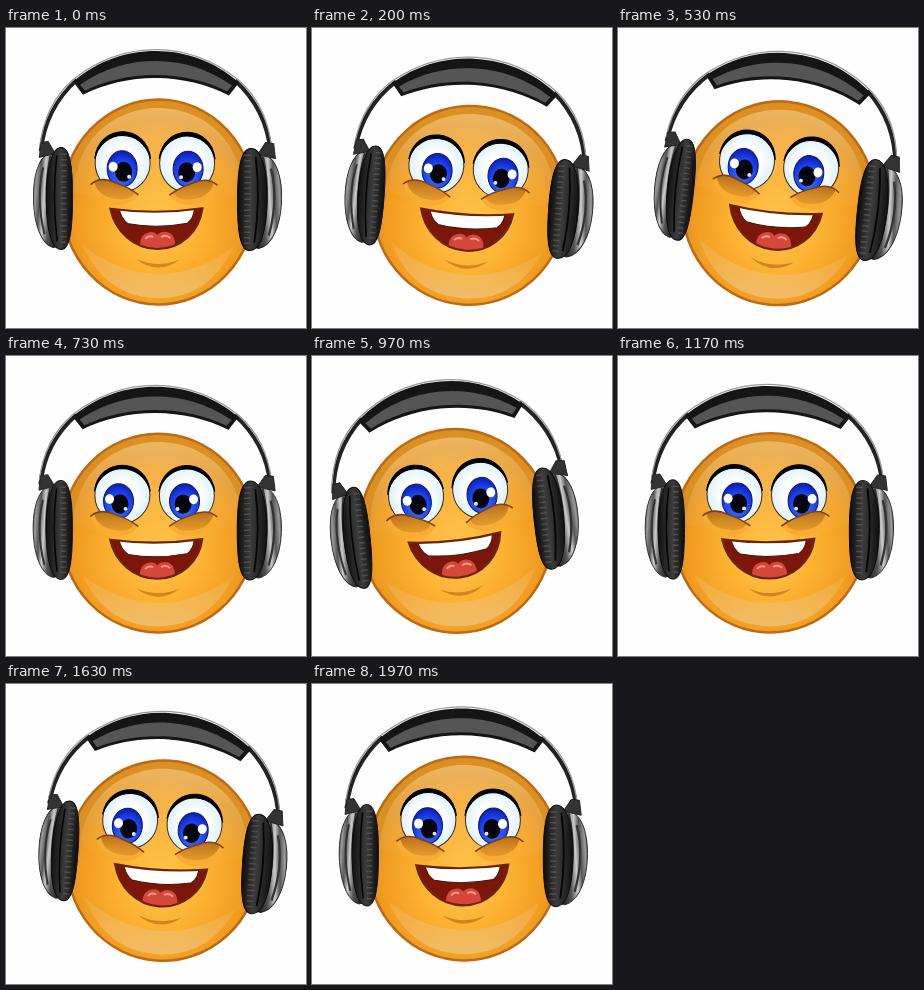
These frames come from a looping animation (300x300 px, 2000 ms). An HTML page:

```html
<!DOCTYPE html>
<html lang="en">
<head>
<meta charset="utf-8">
<title>Smiley with headphones</title>
<style>
html, body { margin: 0; height: 100%; overflow: hidden; background: #fefefe; }
svg { display: block; width: 100%; height: 100%; }
</style>
</head>
<body>
<svg viewBox="0 0 300 300">
  <defs>
    <radialGradient id="skin" cy=".6">
      <stop offset="0" stop-color="#ffc74f"/>
      <stop offset=".5" stop-color="#fcb030"/>
      <stop offset=".85" stop-color="#f09c20"/>
      <stop offset="1" stop-color="#dc8f22"/>
    </radialGradient>
    <linearGradient id="gloss" x2="0" y2="1">
      <stop offset="0" stop-color="#ffdca0" stop-opacity=".5"/>
      <stop offset="1" stop-color="#ffd68a" stop-opacity="0"/>
    </linearGradient>
    <linearGradient id="glow" x2="0" y2="1">
      <stop offset="0" stop-color="#f4c070" stop-opacity=".2"/>
      <stop offset="1" stop-color="#efc37c" stop-opacity=".8"/>
    </linearGradient>
    <linearGradient id="cheek" x2="0" y2="1">
      <stop offset="0" stop-color="#b8701c"/>
      <stop offset="1" stop-color="#d88c26" stop-opacity=".6"/>
    </linearGradient>
    <radialGradient id="white">
      <stop offset=".5" stop-color="#fff"/>
      <stop offset="1" stop-color="#def1fa"/>
    </radialGradient>
    <radialGradient id="iris" cx=".5" cy=".7" r=".7">
      <stop offset="0" stop-color="#3f78ff"/>
      <stop offset=".6" stop-color="#1c44ee"/>
      <stop offset="1" stop-color="#0c1cae"/>
    </radialGradient>
    <linearGradient id="metal" x2="1" y2=".2">
      <stop offset="0" stop-color="#333"/>
      <stop offset=".15" stop-color="#999"/>
      <stop offset=".3" stop-color="#555"/>
      <stop offset=".45" stop-color="#ccc"/>
      <stop offset=".65" stop-color="#555"/>
      <stop offset="1" stop-color="#111"/>
    </linearGradient>
    <linearGradient id="foam">
      <stop offset="0" stop-color="#111"/>
      <stop offset=".55" stop-color="#3c3c3c"/>
      <stop offset="1" stop-color="#0c0c0c"/>
    </linearGradient>
    <path id="lips" d="M104 181Q150 187 196 180C193 204 174 221 151 221S109 204 104 181Z"/>
    <clipPath id="mouth"><use href="#lips"/></clipPath>
    <g id="eye">
      <ellipse rx="27.5" ry="29" fill="url(#white)" stroke="#3a2a1a"/>
      <path d="M-28-4C-24-40 24-40 28-4C20-35-20-35-28-4Z" stroke="#000"/>
    </g>
    <g id="pupil">
      <ellipse rx="15" ry="18" fill="url(#iris)" stroke="#0a1480"/>
      <ellipse cx="1.5" cy="3" rx="8.5" ry="10" fill="#04050f"/>
      <ellipse cx="-9" cy="-2" rx="4.5" ry="5" fill="#fff"/>
      <circle cx="7" cy="8" r="2" fill="#dce8ff"/>
    </g>
    <g id="lid">
      <path d="M-25-1Q-15-10 0-3Q14 2 23 9Q16 20 0 19Q-20 16-25-1Z" fill="#f8ac32"/>
      <path d="M-21-3Q-12-9 2-2L19 7Q14 15 0 13Q-17 11-21-3Z" fill="url(#cheek)"/>
      <path d="M-25-1Q-15-10 0-3Q14 2 23 9" fill="none" stroke="#7a4210" stroke-width="1.6"/>
    </g>
    <g id="cup">
      <path d="M40 126C27 130 20 149 21 173S31 217 46 220L56 218V124Z" fill="url(#metal)" stroke="#222"/>
      <path d="M33 140Q24 171 35 207M42 128Q31 171 46 217" fill="none" stroke="#333" stroke-width="2.5"/>
      <path d="M28 130L30 115L39 114L48 126Z" fill="#333" stroke="#222"/>
      <path d="M54 120C67 118 70 142 70 170S68 221 57 222C43 223 37 199 37 171S43 121 54 120Z" fill="url(#foam)" stroke="#080808"/>
      <path d="M59 126V216" stroke="#888" stroke-width="7" stroke-dasharray="1.5 4" opacity=".35"/>
      <path d="M50 128Q44 170 51 214" fill="none" stroke="#050505" stroke-width="2"/>
    </g>
  </defs>

  <g id="head">
    <ellipse cx="152" cy="174" rx="96.5" ry="102.5" fill="url(#skin)" stroke="#bd6a12" stroke-width="2.5"/>
    <path d="M68 165C68 112 108 80 152 80S236 112 236 165Q152 195 68 165Z" fill="url(#gloss)"/>
    <path d="M76 217Q112 246 152 246T228 217Q204 270 152 270T76 217Z" fill="url(#glow)"/>

    <use href="#eye" x="116" y="135"/>
    <use href="#eye" x="180.5" y="135"/>
    <g id="gaze">
      <use href="#pupil" x="115" y="141"/>
      <use href="#pupil" transform="translate(181 141) scale(-1 1)"/>
    </g>
    <use href="#lid" x="109" y="158"/>
    <use href="#lid" transform="translate(186 158) scale(-1 1)"/>

    <g clip-path="url(#mouth)">
      <path d="M100 170H205V225H100Z" fill="#7c160a"/>
      <path d="M134 222Q132 205 145 204Q149 204 151 207Q155 203 161 204Q170 206 169 222Z" fill="#d4473a"/>
      <path d="M139 211Q142 207 147 209M155 209Q160 206 164 210" fill="none" stroke="#f59a8a" stroke-width="2"/>
      <path d="M112 175H188Q189 189 181 195Q150 201 122 196Q113 190 112 175Z" fill="#fff" stroke="#4a1206"/>
    </g>
    <use href="#lips" fill="none" stroke="#6a2408" stroke-width="2.2"/>
    <path d="M130 231Q152 241 174 231Q152 248 130 231Z" fill="#cf8420"/>

    <path d="M34 124C37 95 48 72 70 52M264 124C261 95 250 72 228 52" fill="none" stroke="#222" stroke-width="4"/>
    <path d="M66 54C92 32 120 23 149 23S206 32 232 54L222 67C200 56 175 50 149 50S98 56 76 67Z" fill="#151515"/>
    <path d="M73 57C98 40 123 33 149 33S200 40 225 57L220 63C200 53 175 47 149 47S98 53 78 63Z" fill="#555"/>
    <path d="M33 120C36 92 48 68 66 52C92 31 120 21.5 149 21.5S206 31 232 52C250 68 262 92 265 120" fill="none" stroke="#999" stroke-width="1.3"/>
    <use href="#cup" transform="translate(10.2) scale(.8 1)"/>
    <use href="#cup" transform="translate(294) scale(-.9 1)"/>
  </g>
</svg>
<script>
const LOOP = 2000, BEAT = 500;
// Sway keys: time in ms, tilt in degrees
const keys = [[0, .3], [400, 8.4], [530, 6.2], [730, .2], [915, -5.8],
  [1070, -4], [1170, .2], [1400, 9], [1630, 4], [2000, .3]];
const head = document.getElementById("head");
const gaze = document.getElementById("gaze");

function slope(i) {
  const n = keys.length - 1;
  const [t0, a0] = i > 0 ? keys[i - 1] : [keys[n - 1][0] - LOOP, keys[n - 1][1]];
  const [t1, a1] = i < n ? keys[i + 1] : [keys[1][0] + LOOP, keys[1][1]];
  return (a1 - a0) / (t1 - t0);
}

// Smooth cubic through the keys
function tilt(time) {
  const t = (time + LOOP) % LOOP;
  const i = keys.findIndex(k => k[0] > t) - 1;
  const [t0, a0] = keys[i], [t1, a1] = keys[i + 1];
  const d = t1 - t0, u = (t - t0) / d, v = 1 - u;
  return v * v * (1 + 2 * u) * a0 + u * u * (3 - 2 * u) * a1
    + u * v * d * (v * slope(i) - u * slope(i + 1));
}

function draw(now) {
  const t = now % LOOP;
  const squash = 1 - .031 * Math.abs(Math.sin(Math.PI * t / BEAT));
  head.setAttribute("transform",
    `rotate(${tilt(t)} 151 255) translate(0 ${277 * (1 - squash)}) scale(1 ${squash})`);
  // The eyes lead the sway
  gaze.setAttribute("transform", `translate(${1.4 * (tilt(t + 30) - tilt(t - 30))})`);
}

const start = performance.now();
function frame() {
  draw(performance.now() - start);
  requestAnimationFrame(frame);
}
frame();
</script>
</body>
</html>
```
